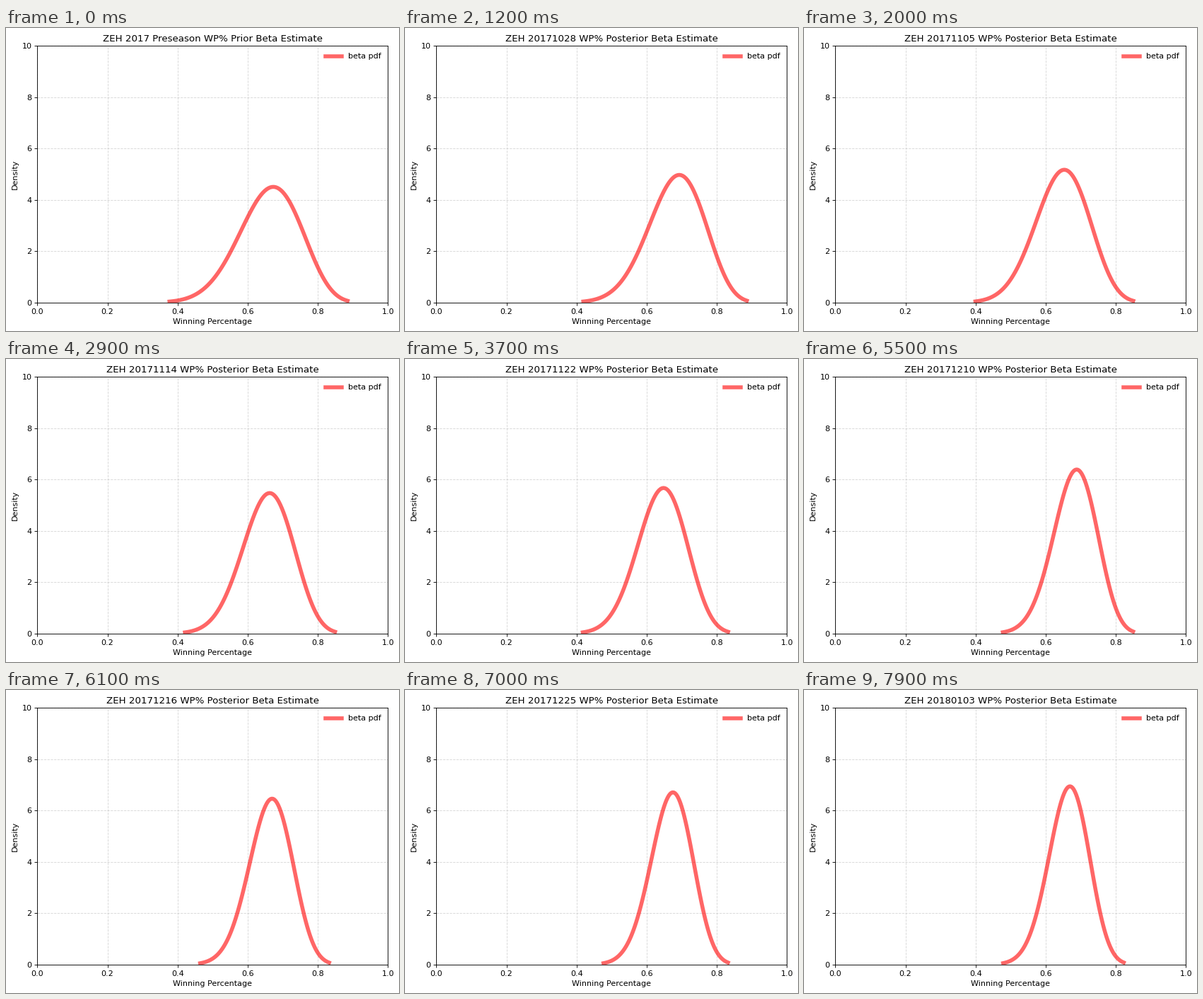
A matplotlib script for the animation above (8000 ms loop, 556x428 px).

```python
import math

import matplotlib.pyplot as plt
import numpy as np
from matplotlib.animation import FuncAnimation

W, H, DPI = 556, 428, 80
FRAMES, STEP_MS = 80, 100
TEAM = "ZEH"
START = np.datetime64("2017-10-16")

# Prior belief, then one update per game (days since START)
PRIOR_A, PRIOR_B = 18.97, 9.73
WINS = np.array([2, 5, 7, 9, 18, 20, 22, 26, 29, 32, 35, 39, 42, 44, 46,
                 49, 51, 53, 54, 61, 63, 65, 68, 71, 73, 78])
LOSSES = np.array([11, 13, 14, 17, 25, 30, 37, 48, 57, 60, 66, 75, 79])

GRID = np.linspace(0, 1, 4001)[1:-1]

plt.rcParams.update({"font.family": "DejaVu Sans", "font.size": 10})


def beta_pdf(x, a, b):
    log_norm = math.lgamma(a + b) - math.lgamma(a) - math.lgamma(b)
    return np.exp(log_norm + (a - 1) * np.log(x) + (b - 1) * np.log1p(-x))


def beta_curve(a, b, tail=0.001, points=100):
    """Density between the two tail quantiles."""
    cdf = np.cumsum(beta_pdf(GRID, a, b))
    lo, hi = np.interp([tail, 1 - tail], cdf / cdf[-1], GRID)
    x = np.linspace(lo, hi, points)
    return x, beta_pdf(x, a, b)


def title_for(day):
    if day == 0:
        return f"{TEAM} 2017 Preseason WP% Prior Beta Estimate"
    date = str(START + day).replace("-", "")
    return f"{TEAM} {date} WP% Posterior Beta Estimate"


fig = plt.figure(figsize=(W / DPI, H / DPI), dpi=DPI, facecolor="white")
left, right, top, bottom = 44.3, 540.3, 25.4, 387.8
ax = fig.add_axes([left / W, 1 - bottom / H,
                   (right - left) / W, (bottom - top) / H])
ax.set(xlim=(0, 1), ylim=(0, 10),
       xlabel="Winning Percentage", ylabel="Density")
ax.grid(linestyle="--", alpha=0.5)

curve, = ax.plot([], [], "r-", lw=5, alpha=0.6, label="beta pdf")
title = ax.set_title(title_for(0), fontsize=12)
ax.legend(loc="upper right", frameon=False)


def update(day):
    a = PRIOR_A + np.count_nonzero(WINS <= day)
    b = PRIOR_B + np.count_nonzero(LOSSES <= day)
    curve.set_data(*beta_curve(a, b))
    title.set_text(title_for(day))
    return curve, title


anim = FuncAnimation(fig, update, frames=FRAMES, interval=STEP_MS,
                     repeat=True, repeat_delay=0, blit=False)
plt.show()
```
